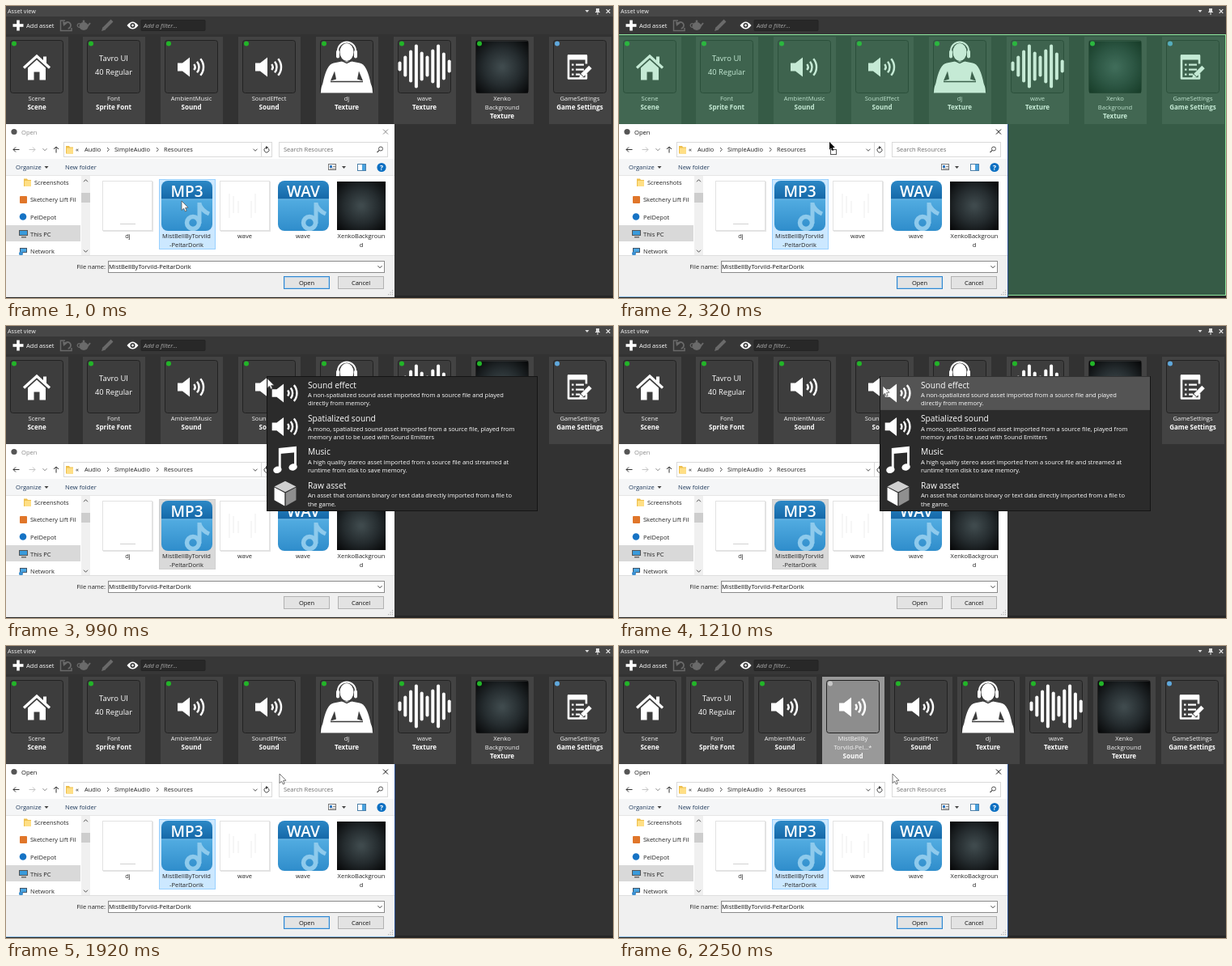
Recreate the animation shown at these times as an HTML page with a canvas. Size 750 by 361 pixels, loop 3230 ms.

```html
<!DOCTYPE html>
<html lang="en">
<head>
<meta charset="utf-8">
<title>Asset import</title>
<style>
  html, body { margin: 0; width: 100%; height: 100%; overflow: hidden; background: #323232; }
  canvas { display: block; width: 750px; height: 361px; }
</style>
</head>
<body>
<canvas id="stage"></canvas>
<script>
const W = 750, H = 361, LOOP = 3230;
const T = { drag: 100, green: 320, menu: 990, hover: [1210, 1390, 1490], pick: 1920, add: 2150, thumb: 2250 };
const FONT = "'Open Sans', 'Noto Sans', sans-serif";
const FILE = ['MistBellByTorvild', '-PeltarDorik'];
const canvas = document.getElementById('stage');
const c = canvas.getContext('2d');
const dpr = window.devicePixelRatio || 1;
canvas.width = W * dpr;
canvas.height = H * dpr;

// Drawing helpers
function rect(x, y, w, h, fill, line) {
  if (fill) { c.fillStyle = fill; c.fillRect(x, y, w, h); }
  if (line) { c.strokeStyle = line; c.lineWidth = 1; c.strokeRect(x + .5, y + .5, w - 1, h - 1); }
}
function round(x, y, w, h, r, fill, line) {
  c.beginPath();
  c.roundRect(x, y, w, h, r);
  if (fill) { c.fillStyle = fill; c.fill(); }
  if (line) { c.strokeStyle = line; c.lineWidth = 1; c.stroke(); }
}
function oval(x, y, rx, ry, fill, turn = 0) {
  c.beginPath();
  c.ellipse(x, y, rx, ry, turn, 0, 7);
  c.fillStyle = fill;
  c.fill();
}
const disc = (x, y, r, fill) => oval(x, y, r, r, fill);
function trace(p) {
  c.beginPath();
  for (let i = 0; i < p.length; i += 2) c.lineTo(p[i], p[i + 1]);
}
function poly(p, fill) { trace(p); c.fillStyle = fill; c.fill(); }
function line(p, color, w = 1) {
  trace(p);
  c.strokeStyle = color;
  c.lineWidth = w;
  c.stroke();
}
function arc(x, y, r, a, b, color, w) {
  c.beginPath();
  c.arc(x, y, r, a, b);
  c.strokeStyle = color;
  c.lineWidth = w;
  c.stroke();
}
function text(s, x, y, size, color, align = 'left', style = '') {
  c.font = `${style} ${size}px ${FONT}`;
  c.textAlign = align;
  c.fillStyle = color;
  c.fillText(s, x, y);
}
function at(x, y, scale, draw) {
  c.save();
  c.translate(x, y);
  c.scale(scale, scale);
  draw();
  c.restore();
}
const caret = (x, y, color) => poly([x - 2.5, y - 1.5, x + 2.5, y - 1.5, x, y + 1.5], color);
const chevron = (x, y, color, dy = 1) => line([x - 2.5, y - dy * 1.3, x, y + dy * 1.3, x + 2.5, y - dy * 1.3], color);
const cross = (x, y, r, color, w) => {
  line([x - r, y - r, x + r, y + r], color, w);
  line([x + r, y - r, x - r, y + r], color, w);
};

// Icons, centred on the origin
function speaker() {
  poly([-17, -5, -11, -5, -2, -12, -2, 12, -11, 5, -17, 5], '#fff');
  for (const r of [5.5, 10.5, 16]) arc(-1, 0, r, -.7, .7, '#fff', 2.5);
}
function house() {
  rect(8, -13, 4, 9, '#fff');
  line([-16, 1, 0, -13.5, 16, 1], '#fff', 3.2);
  poly([-11, 1, 0, -9, 11, 1, 11, 16, 3.5, 16, 3.5, 6, -3.5, 6, -3.5, 16, -11, 16], '#fff');
}
function fontSample() {
  text('Tavro UI', 0, -8, 9.5, '#fff', 'center', '500');
  text('40 Regular', 0, 9.5, 9.3, '#fff', 'center', '500');
}
function dj() {
  c.beginPath();
  c.moveTo(-30, 22);
  c.quadraticCurveTo(-25, -4, -16, -5);
  c.lineTo(-6, -7);
  c.lineTo(6, -7);
  c.lineTo(16, -5);
  c.quadraticCurveTo(25, -4, 30, 22);
  c.fillStyle = '#fff';
  c.fill();
  for (const s of [-1, 1]) poly([s * 15, 5, s * 13, 15, s * 20, 17], '#3b3b3b');
  c.beginPath();
  c.moveTo(-32, 32);
  c.quadraticCurveTo(-32, 18, -24, 18);
  c.lineTo(24, 18);
  c.quadraticCurveTo(32, 18, 32, 32);
  c.fillStyle = '#fff';
  c.fill();
  line([-20, 18, 20, 18], '#3b3b3b', 1.4);
  oval(0, -18.5, 8.5, 11, '#fff');
  line([-6, -8, 0, -5, 6, -8], '#3b3b3b', 1.4);
  arc(0, -20, 11, Math.PI, 0, '#fff', 2);
  round(-13, -21, 4, 10, 2, '#fff');
  round(9, -21, 4, 10, 2, '#fff');
}
function wave() {
  [12, 26, 40, 54, 36, 26, 42, 54, 34, 16].forEach((h, i) =>
    round(-32.5 + 6.8 * i, -h / 2 - 1, 4, h, 2, '#fff'));
}
function texture(r) {
  const g = c.createRadialGradient(0, 0, 2, 0, 0, r * 1.35);
  g.addColorStop(0, '#3f4a4d');
  g.addColorStop(.5, '#252c2f');
  g.addColorStop(1, '#08090a');
  rect(-r, -r, 2 * r, 2 * r, g);
}
function settings() {
  c.lineJoin = 'round';
  line([8, 8, 8, 14, -14, 14, -14, -14, 8, -14, 8, -4], '#fff', 2.6);
  rect(-15, -15, 24, 6, '#fff');
  for (const y of [-4, 2, 8]) {
    rect(-10, y, 2.5, 2.2, '#fff');
    rect(-5, y, y < 3 ? 10 : 5, 2.2, '#fff');
  }
  line([3, 10, 13, 0], '#fff', 5);
  poly([-1, 14, .5, 8.5, 4.5, 12.5], '#fff');
  c.lineJoin = 'miter';
}
function music() {
  line([-7, 11, -7, -14, 13, -16, 13, 8], '#fff', 3);
  line([-7, -11, 13, -13], '#fff', 6);
  oval(-10, 12.5, 5.5, 4.3, '#fff', -.3);
  oval(10, 9, 5.5, 4.3, '#fff', -.3);
}
function cube() {
  poly([0, -16, 14, -9, 0, -2, -14, -9], '#cfcfcf');
  poly([-14, -8, -.7, -1, -.7, 16, -14, 8.5], '#fff');
  poly([14, -8, .7, -1, .7, 16, 14, 8.5], '#8f8f8f');
}

// Asset panel
const ASSETS = [
  [['Scene'], 'Scene', house],
  [['Font'], 'Sprite Font', fontSample],
  [['AmbientMusic'], 'Sound', speaker],
  [['SoundEffect'], 'Sound', speaker],
  [['dj'], 'Texture', dj],
  [['wave'], 'Texture', wave],
  [['Xenko', 'Background'], 'Texture', () => texture(32)],
  [['GameSettings'], 'Game Settings', settings, '#5fa8dc']
];
const ADDED = [['MistBellBy', 'Torvild-Pel...*'], 'Sound', speaker, '#c8c8c8'];

function card(x, [names, type, icon, dot = '#22b528'], selected, loaded) {
  rect(x - 38, 38, 77, 108, selected ? '#999' : '#434343');
  round(x - 32.5, 42.5, 65, 65, 3, selected ? '#8d8d8d' : '#3d3d3d', '#222');
  if (loaded) at(x, 75.5, 1, icon);
  disc(x - 28, 46.5, 3, dot);
  names.forEach((s, i) => text(s, x, 117.3 + 10.4 * i, 7.6, '#f4f4f4', 'center', '500'));
  text(type, x, 117.7 + 10.4 * names.length, 8, '#fff', 'center', 'bold');
}

function header() {
  rect(0, 0, W, 13, '#474747');
  text('Asset view', 2, 9, 7.2, '#f4f4f4');
  caret(718, 6.5, '#ddd');
  rect(729, 3, 4, 4, '#ddd');
  line([728, 7.5, 734, 7.5], '#ddd');
  line([731, 8, 731, 11], '#ddd');
  cross(744, 6.5, 2.3, '#eee', 1.2);
  rect(0, 13, W, 22, '#373737');

  line([15, 17.5, 15, 30.5], '#fff', 3.6);
  line([8.5, 24, 21.5, 24], '#fff', 3.6);
  text('Add asset', 25, 27.2, 7.6, '#fff', 'left', '500');
  const dim = '#6a6a6a';
  line([73, 18, 67.5, 18, 67.5, 30.5, 81, 30.5, 81, 27], dim, 1.5);
  arc(76, 24, 4, -2.6, 1.4, dim, 1.8);
  poly([70, 19, 76, 21, 71, 25], dim);
  oval(96, 25, 5.5, 5, dim);
  disc(96, 19, 1.4, dim);
  line([100, 26, 104, 21], dim, 2);
  arc(90.5, 24, 2.3, 1, 5.3, dim, 1.3);
  line([121, 28, 131, 18], dim, 4);
  poly([118, 31, 119.5, 26, 123, 29.6], dim);
  c.beginPath();
  c.moveTo(149.5, 24);
  c.quadraticCurveTo(156.5, 15, 163.5, 24);
  c.quadraticCurveTo(156.5, 33, 149.5, 24);
  c.fillStyle = '#fff';
  c.fill();
  disc(156.5, 24, 3, '#333');
  disc(156.5, 24, 1.4, '#fff');
  round(167, 17.5, 79, 13, 1, '#282828', '#242424');
  text('Add a filter...', 170, 26.8, 7.5, '#a8a8a8', 'left', 'italic');
}

function panel(t) {
  rect(0, 0, W, H, '#323232');
  header();
  const items = ASSETS.slice();
  const added = t >= T.add;
  if (added) items.splice(3, 0, ADDED);
  const step = added ? 83.75 : 95.86;
  items.forEach((item, i) => {
    const fresh = item === ADDED;
    card(Math.round(37.5 + step * i), item, fresh, !fresh || t >= T.thumb);
  });
  rect(0, 358, W, 3, '#262626');
  if (t >= T.green && t < T.menu) {
    rect(0, 35, W, 323, 'rgba(65,185,118,.3)');
    rect(-1, 35, W + 1, 323, null, '#90e8a0');
  }
}

// File dialog
function folder(x, y) {
  poly([x, y - 4.5, x + 4, y - 4.5, x + 5, y - 3, x + 9, y - 3, x + 9, y + 5, x, y + 5], '#eebf4d');
  rect(x + 1, y - 2, 8, 7, '#ffdf85');
}
function audioIcon(x, label) {
  const g = c.createLinearGradient(0, 216, 0, 278);
  g.addColorStop(0, '#2c88c6');
  g.addColorStop(.36, '#1568a8');
  g.addColorStop(.37, '#52ace1');
  g.addColorStop(1, '#2f8dcb');
  round(x, 216, 63, 62, 8, g);
  c.save();
  c.clip();
  const pale = '#8ecaec';
  arc(x + 39, 268, 7.5, 0, 7, pale, 5.5);
  line([x + 47, 269, x + 47, 243], pale, 5);
  c.beginPath();
  c.moveTo(x + 47, 245);
  c.quadraticCurveTo(x + 50, 253, x + 59, 257);
  c.lineWidth = 5;
  c.stroke();
  line([x, 239, x + 63, 239], '#75bce6', 1);
  c.restore();
  text(label, x + 31.5, 235.5, 19, '#fff', 'center', '600');
}
function paper(x) {
  rect(x + 1, 217, 62, 62, '#e4e4e4');
  rect(x, 216, 62, 62, '#fff', '#e2e2e2');
}
function caption(lines, x) {
  lines.forEach((s, i) => text(s, x, 287.3 + 10.2 * i, 7.5, '#222', 'center'));
}

function sidebar() {
  c.save();
  c.beginPath();
  c.rect(0, 209, 92, 99);
  c.clip();
  rect(0, 271, 92, 20, '#d9d9d9');
  folder(22, 218);
  round(17, 235, 9, 9, 1, '#e0762a');
  disc(21, 260.5, 4.3, '#1673c4');
  rect(16, 277, 11, 7, '#3a9bdc', '#555');
  rect(19, 285, 6, 1.5, '#666');
  rect(17, 299, 9, 6, '#4aa5e2', '#456');
  disc(18.5, 306, 2.5, '#3c8fd0');
  [['Screenshots', 35], ['Sketchery Lift Fil', 30], ['PelDepot', 30], ['This PC', 30], ['Network', 30]]
    .forEach(([s, x], i) => text(s, x, 221 + 21.3 * i, 7.5, '#222'));
  c.restore();
  rect(93, 210, 11, 98, '#f0f0f0');
  rect(93, 231, 11, 12, '#cdcdcd');
  chevron(98.5, 216, '#555', -1);
  chevron(98.5, 303, '#555');
}

function addressBar() {
  line([16.5, 177.5, 9, 177.5], '#333');
  line([12, 174.5, 9, 177.5, 12, 180.5], '#333');
  line([28.5, 177.5, 36, 177.5], '#c4c4c4');
  line([33, 174.5, 36, 177.5, 33, 180.5], '#c4c4c4');
  chevron(48, 177.5, '#888');
  line([62, 181.5, 62, 174], '#333');
  line([59, 177, 62, 174, 65, 177], '#333');
  rect(71, 168, 258, 19, '#fff', '#d9d9d9');
  folder(74, 177.5);
  const ink = '#222';
  text('«', 86, 180, 8, ink);
  [['Audio', 97], ['SimpleAudio', 134], ['Resources', 195]].forEach(([s, x]) => text(s, x, 180, 7.5, ink));
  for (const x of [126, 187]) line([x - 1, 175, x + 1.3, 177.5, x - 1, 180], '#555');
  chevron(308, 178, '#555');
  line([315.5, 169, 315.5, 186], '#d9d9d9');
  arc(322, 178, 3, -.6, 4.6, '#444', 1);
  poly([321, 173, 324.5, 175, 321, 177], '#444');
  rect(337, 168, 135, 19, '#fff', '#d9d9d9');
  text('Search Resources', 343, 180.3, 7.5, '#6d6d6d');
  arc(463, 176.5, 2.5, 0, 7, '#555', 1);
  line([461, 178.5, 458.5, 181], '#555', 1.2);
}

function toolbar() {
  rect(0, 189, 480, 21, '#f5f6f7');
  line([0, 209.5, 480, 209.5], '#e6e6e6');
  text('Organize', 12, 202.2, 7.6, '#1e395b');
  caret(50, 199.5, '#444');
  text('New folder', 73, 202.2, 7.6, '#1e395b');
  rect(398, 195, 10, 8, '#fff', '#777');
  rect(400, 197, 3, 3, '#3178c0');
  line([404, 198.5, 407, 198.5], '#888');
  line([400, 201, 407, 201], '#888');
  caret(417.5, 199.5, '#444');
  rect(434, 195, 11, 9, '#fff', '#4b7fa8');
  rect(440, 196, 4, 7, '#4aa3df');
  disc(464, 199.5, 5.6, '#0b6fc2');
  text('?', 464, 202.8, 8.5, '#fff', 'center', 'bold');
}

function files(active) {
  paper(119);
  line([141, 269.5, 160, 269.5], '#d2d2d2');
  rect(189, 214, 70, 87, active ? '#cce8ff' : '#d9d9d9', active ? '#99d1ff' : '#d0d0d0');
  audioIcon(192, 'MP3');
  paper(264);
  for (const x of [276, 281, 287, 303, 308]) line([x, 232 + x % 4 * 3, x, 262 - x % 3 * 3], '#ededed');
  audioIcon(336, 'WAV');
  at(439, 247, 1, () => texture(30));
  caption(['dj'], 150.5);
  caption(FILE, 223);
  caption(['wave'], 295);
  caption(['wave'], 367);
  caption(['XenkoBackgroun', 'd'], 439);
}

function button(s, x, primary) {
  rect(x, 334, 57, 16, '#e3e3e3', primary ? '#2f86cf' : '#b2b2b2');
  if (primary) rect(x + 1, 335, 55, 14, null, '#b4d3ec');
  text(s, x + 28.5, 345, 7.5, '#111', 'center');
}

function dialog(t) {
  const active = t < T.menu || t >= T.pick;
  const lit = active && t >= T.drag;
  const ink = lit ? '#111' : '#8a8a8a';
  rect(0, 146, 480, 214, '#fff');
  if (lit) rect(480, 146, 1, 213, '#2b4f8f');
  disc(10, 155.5, 3.6, '#555');
  text('Open', 19, 158.5, 7.6, ink);
  cross(469, 155.5, 3, ink, 1);
  addressBar();
  toolbar();
  sidebar();
  files(active);
  rect(0, 308, 480, 51, '#f0f0f0');
  rect(0, 359, 480, 1, lit ? '#8fbfe6' : '#e4e4e4');
  line([0, 308.5, 480, 308.5], '#dfdfdf');
  text('File name:', 123, 325.3, 7.5, '#222', 'right');
  rect(126, 315, 342, 15, '#fff', '#8a8a8a');
  text(FILE.join(''), 127, 325.3, 7.5, '#111');
  chevron(462, 322.5, '#444');
  button('Open', 343, active);
  button('Cancel', 410, false);
  for (let i = 0; i < 3; i++)
    for (let j = 0; j <= i; j++) rect(477 - 2.5 * j, 351 + 2.5 * i, 1.2, 1.2, '#b5b5b5');
}

// Import menu
const MENU = [
  ['Sound effect', 'A non-spatialized sound asset imported from a source file and played', 'directly from memory.', speaker],
  ['Spatialized sound', 'A mono, spatialized sound asset imported from a source file, played from', 'memory and to be used with Sound Emitters', speaker],
  ['Music', 'A high quality stereo asset imported from a source file and streamed at', 'runtime from disk to save memory.', music],
  ['Raw asset', 'An asset that contains binary or text data directly imported from a file to', 'the game.', cube]
];
function menu(t) {
  const hover = T.hover.filter(h => t >= h).length - 1;
  rect(322, 62, 335, 167, '#2b2b2b', '#151515');
  MENU.forEach(([title, a, b, icon], i) => {
    const y = 62.5 + 41.4 * i;
    if (i === hover) rect(323, y, 333, 41.4, '#545454');
    at(345, y + 20.5, .96, icon);
    text(title, 373, y + 14, 10.2, '#fff', 'left', '500');
    text(a, 373, y + 25.6, 7.5, '#fff', 'left', '500');
    text(b, 373, y + 35.8, 7.5, '#fff', 'left', '500');
  });
}

// Pointer: [time, x, y]
const PATH = [
  [0, 217, 241], [100, 222, 226], [210, 238, 200], [320, 260, 168], [440, 279, 139], [540, 297, 108],
  [650, 312, 85], [750, 323, 65], [1210, 326, 74], [1390, 331, 118], [1490, 338, 158]
];
function pointer(t) {
  const [, x, y] = PATH.filter(p => t >= p[0]).pop();
  const drag = t >= T.drag && t < T.menu;
  at(x, y, 1, () => {
    const p = [0, 0, 0, 11.5, 2.6, 9.2, 4.4, 13, 6.2, 12.2, 4.6, 8.5, 8, 8.2, 0, 0];
    if (drag) {
      rect(1, 9, 8, 7, '#fff', '#555');
      at(0, 0, .85, () => poly(p, '#000'));
    } else {
      poly(p, '#fff');
      line(p, '#555', .8);
    }
  });
}

function draw(t) {
  c.setTransform(dpr, 0, 0, dpr, 0, 0);
  panel(t);
  dialog(t);
  if (t >= T.menu && t < T.pick) menu(t);
  pointer(t);
}
const start = performance.now();
function frame() {
  draw((performance.now() - start) % LOOP);
  requestAnimationFrame(frame);
}
frame();
</script>
</body>
</html>
```
